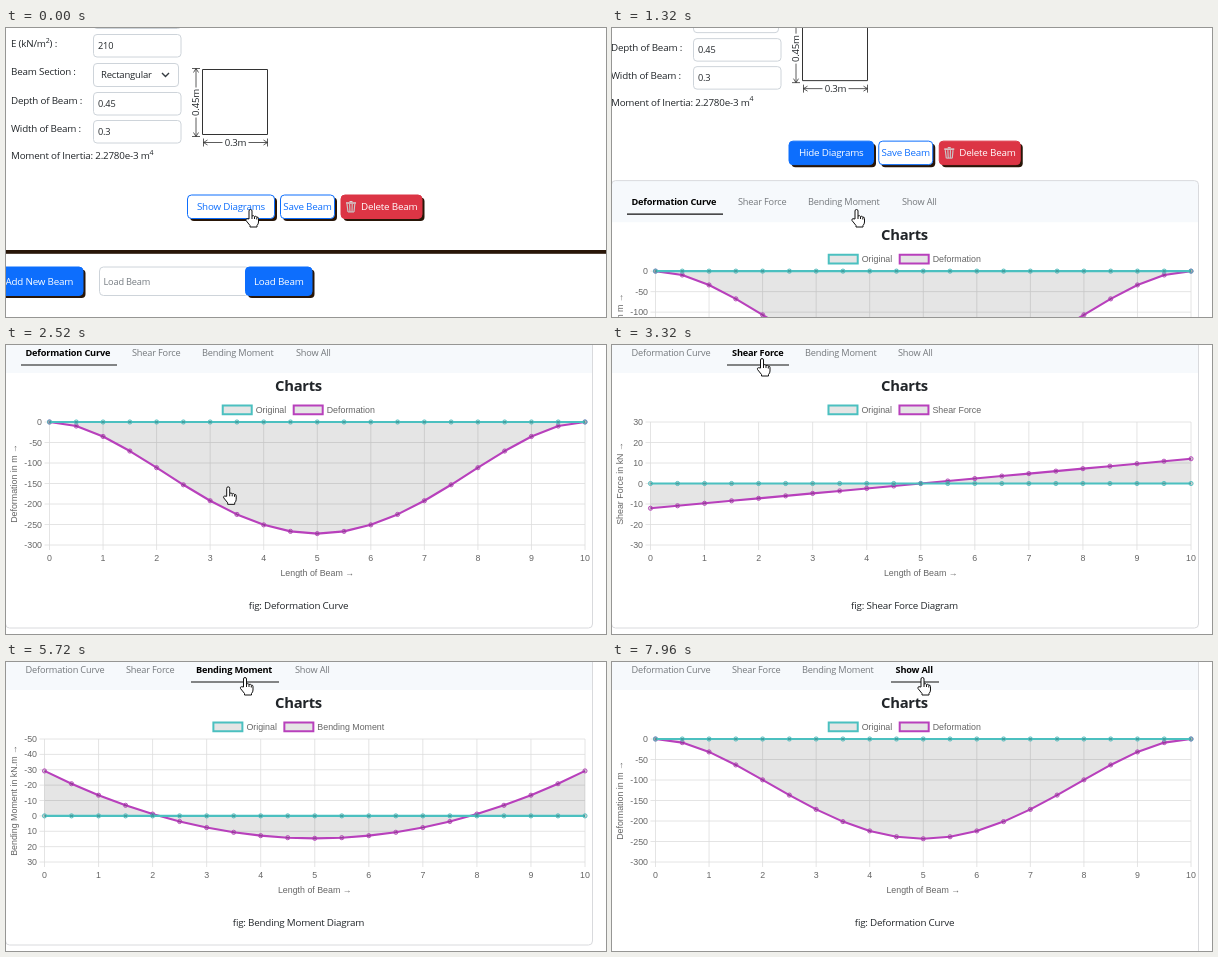
An HTML page with a canvas for the animation above (8 s loop, 600x289 px).

```html
<!DOCTYPE html>
<html lang="en">
<head>
<meta charset="utf-8">
<title>Beam diagrams</title>
<style>
html, body { margin: 0; width: 100%; height: 100%; overflow: hidden; background: #fff; }
canvas { display: block; }
</style>
</head>
<body>
<canvas id="stage" width="600" height="289"></canvas>
<script>
const ctx = document.getElementById('stage').getContext('2d');
const LOOP = 8000;
const UI = '"Open Sans", "Noto Sans", sans-serif';
const PLOT_FONT = '"Liberation Sans", Arial, sans-serif';
const INK = '#212529', BLUE = '#0d6efd', RED = '#dc3545', SHADOW = '#291608';
const TEAL = '#4bc0c0', PURPLE = '#b840bc', SHADE = 'rgba(0,0,0,.1)';
const SHOW_AT = 780;

// Fixed-end beam under a uniform load
const LOAD = 5, SPAN = 10, PEAK = 272.2;
const charts = {
  deformation: {
    name: 'Deformation', axis: 'Deformation in m →', caption: 'Deformation Curve',
    left: 43.5, top: 0, bottom: -300, step: 50,
    value: x => -PEAK * 16 * (x * (SPAN - x)) ** 2 / SPAN ** 4
  },
  shear: {
    name: 'Shear Force', axis: 'Shear Force in kN →', caption: 'Shear Force Diagram',
    left: 38.5, top: 30, bottom: -30, step: 10,
    value: x => LOAD * (x - SPAN / 2)
  },
  bending: {
    name: 'Bending Moment', axis: 'Bending Moment in kN.m →', caption: 'Bending Moment Diagram',
    left: 38.5, top: -50, bottom: 30, step: 10,
    value: x => LOAD * (6 * SPAN * x - SPAN ** 2 - 6 * x * x) / 12
  }
};
const tabNames = ['Deformation Curve', 'Shear Force', 'Bending Moment', 'Show All'];
const views = [
  { at: SHOW_AT, chart: charts.deformation, tabs: [19.5, 126, 196, 290], line: [15, 111] },
  { at: 3169, chart: charts.shear, tabs: [19.5, 120, 193, 286], line: [115, 177] },
  { at: 5460, chart: charts.bending, tabs: [19.5, 120, 190, 289], line: [185, 273] },
  { at: 7532, chart: charts.deformation, tabs: [19.5, 120, 190, 283.5], line: [279, 327] }
];

const scrollKeys = [[1175, 0], [1320, 53.5], [1720, 201.5], [1780, 214], [1860, 219], [1920, 220]];
const pointerKeys = [[2300, 244.5, 182], [3000, 150, 14], [4500, 150, 14],
  [5250, 239, 16], [6400, 239, 16], [7060, 310.5, 16]];

const smooth = u => u * u * (3 - 2 * u);
const easeOutQuart = u => 1 - (1 - u) ** 4;

function track(keys, time, ease = u => u) {
  const next = keys.findIndex(key => key[0] > time);
  if (next === 0) return keys[0].slice(1);
  if (next < 0) return keys.at(-1).slice(1);
  const a = keys[next - 1], b = keys[next];
  const u = ease((time - a[0]) / (b[0] - a[0]));
  return a.slice(1).map((v, i) => v + (b[i + 1] - v) * u);
}

function text(str, x, y, { size = 9.8, color = INK, align = 'left', weight = 400, family = UI } = {}) {
  ctx.font = `${weight} ${size}px ${family}`;
  ctx.letterSpacing = family === UI ? `${-0.02 * size}px` : '0px';
  ctx.fillStyle = color;
  ctx.textAlign = align;
  ctx.fillText(str, x, y + size * 0.35);
  return x + ctx.measureText(str).width;
}

function plotText(str, x, y, align = 'left') {
  return text(str, x, y, { size: 8.85, color: '#666', align, family: PLOT_FONT });
}

function turned(x, y, draw) {
  ctx.save();
  ctx.translate(x, y);
  ctx.rotate(-Math.PI / 2);
  draw();
  ctx.restore();
}

function box(x, y, w, h, r, fill, stroke, width = 1) {
  ctx.beginPath();
  ctx.roundRect(x, y, w, h, r);
  if (fill) { ctx.fillStyle = fill; ctx.fill(); }
  if (stroke) { ctx.strokeStyle = stroke; ctx.lineWidth = width; ctx.stroke(); }
}

function polyline(points, color, width = 1) {
  ctx.beginPath();
  points.forEach(p => ctx.lineTo(...p));
  ctx.strokeStyle = color;
  ctx.lineWidth = width;
  ctx.stroke();
}

function button(label, x, y, w, h, fill, border, color, textX = x + w / 2, align = 'center') {
  box(x + 2.5, y + 2.5, w, h, 4, SHADOW);
  box(x, y, w, h, 4, fill, border);
  text(label, textX, y + h / 2, { color, align });
}

function field(value, y) {
  box(87.5, y, 87.5, 22.5, 3.5, '#fff', '#ced4da');
  text(value, 92, y + 11.5, { size: 9.2 });
}

// Dimension line along x, centred on the origin
function dimension(label, half, gap) {
  for (const side of [-1, 1]) {
    const end = side * half;
    polyline([[side * gap, 0], [end, 0]], '#333', 0.8);
    polyline([[end, -4], [end, 4]], '#333', 0.8);
    polyline([[end - side * 4, -2.5], [end, 0], [end - side * 4, 2.5]], '#333', 0.8);
  }
  text(label, 0, 0, { size: 9.6, align: 'center' });
}

function trashIcon(x, y) {
  polyline([[x, y + 2], [x + 10, y + 2]], '#d5d5d5', 1.5);
  polyline([[x + 3.5, y + 0.5], [x + 6.5, y + 0.5]], '#d5d5d5');
  for (let i = 0; i < 4; i++) {
    polyline([[x + 1 + i * 2.6, y + 3], [x + 2 + i * 2, y + 11]], '#c8cccc', 1.1);
  }
  polyline([[x + 2, y + 11], [x + 8, y + 11]], '#c8cccc');
}

function drawForm(open) {
  field('', -22);
  text(') :', text('2', text('E (kN/m', 5, 16), 12.5, { size: 7 }), 16);
  field('210', 6.5);
  text('Beam Section :', 5, 44);
  box(87.5, 35.5, 85, 23, 3.5, '#fff', '#ced4da');
  text('Rectangular', 95, 47, { size: 9.5 });
  polyline([[156, 45], [159.5, 48.5], [163, 45]], '#343a40', 1.4);
  text('Depth of Beam :', 5, 73);
  field('0.45', 64.5);
  text('Width of Beam :', 5, 101);
  field('0.3', 92.5);
  text('4', text('Moment of Inertia: 2.2780e-3 m', 5, 128), 124.5, { size: 7 });

  box(196.5, 41.5, 65, 65, 0, null, '#333');
  turned(190, 74.5, () => dimension('0.45m', 34, 15));
  ctx.save();
  ctx.translate(229.5, 114.5);
  dimension('0.3m', 32, 13);
  ctx.restore();

  const inset = open ? 1.75 : 0;
  if (open) button('Hide Diagrams', 183, 167, 84.5, 23.5, BLUE, BLUE, '#fff');
  else button('Show Diagrams', 181.5, 167, 87, 23.5, '#fff', BLUE, BLUE);
  button('Save Beam', 274.5 - inset, 167, 54, 23.5, '#fff', BLUE, BLUE);
  button('Delete Beam', 335 - inset, 167, 81, 23.5, RED, RED, '#fff', 355 - inset, 'left');
  trashIcon(340 - inset, 173);
}

function drawFooter() {
  ctx.fillStyle = SHADOW;
  ctx.fillRect(0, 222, 600, 3.8);
  button('Add New Beam', -10, 239, 87, 28.5, BLUE, BLUE, '#fff', -0.5, 'left');
  box(93.5, 239, 150, 28.5, 4, '#fff', '#ced4da');
  text('Load Beam', 97.5, 253.5, { size: 9.2, color: '#757b81' });
  button('Load Beam', 239.5, 239, 66.5, 28.5, BLUE, BLUE, '#fff');
}

function drawLegend(name) {
  ctx.font = `8.85px ${PLOT_FONT}`;
  ctx.letterSpacing = '0px';
  const width = ['Original', name].reduce((sum, s) => sum + ctx.measureText(s).width, 74.5);
  let x = 292.3 - width / 2;
  for (const [label, color] of [['Original', TEAL], [name, PURPLE]]) {
    box(x + 1, 60.5, 29, 8.8, 0, '#e5e5e5', color, 2);
    x = plotText(label, x + 34, 64.5) + 6.5;
  }
}

function drawChart(chart, progress) {
  const { left, top, bottom, step } = chart;
  const right = 579, plotTop = 77, plotBottom = 200;
  const px = x => left + x / SPAN * (right - left);
  const py = v => plotTop + (v - top) / (bottom - top) * (plotBottom - plotTop);
  const grid = '#dedede';

  text('Charts', 292.5, 40.5, { size: 14.8, weight: 700, align: 'center' });
  drawLegend(chart.name);

  const direction = Math.sign(bottom - top);
  for (let v = top; direction * v <= direction * bottom; v += direction * step) {
    polyline([[left - 5, py(v)], [right, py(v)]], grid, 0.8);
    plotText(String(v), left - 7.5, py(v), 'right');
  }
  for (let x = 0; x <= SPAN; x++) {
    polyline([[px(x), plotTop], [px(x), plotBottom + 5]], grid, 0.8);
    plotText(String(x), px(x), 212.5, 'center');
  }
  plotText('Length of Beam →', (left + right) / 2, 228, 'center');
  turned(7.5, 138.5, () => plotText(chart.axis, 0, 0, 'center'));

  const samples = Array.from({ length: 21 }, (_, i) => i / 2);
  const base = samples.map(x => [px(x), py(0)]);
  const curve = samples.map(x => [px(x), py(chart.value(x) * progress)]);

  ctx.beginPath();
  [base[0], ...curve, base[20]].forEach(p => ctx.lineTo(...p));
  ctx.fillStyle = SHADE;
  ctx.fill();
  for (const [points, color] of [[curve, PURPLE], [base, TEAL]]) {
    ctx.lineJoin = 'round';
    polyline(points, color, 2.1);
    for (const [x, y] of points) {
      ctx.beginPath();
      ctx.arc(x, y, 2.1, 0, 7);
      ctx.fillStyle = 'rgba(0,0,0,.16)';
      ctx.fill();
      ctx.lineWidth = 0.9;
      ctx.stroke();
    }
  }
  text('fig: ' + chart.caption, 292.5, 260.5, { align: 'center' });
}

function drawCard(view, time) {
  const active = views.indexOf(view);
  const height = active === 3 ? 900 : 296.5;
  box(-0.5, -13.5, 587, height, 4, '#fff');
  box(-0.5, -13.5, 587, 41.5, [4, 4, 0, 0], '#f6f9fc');
  box(-0.5, -13.5, 587, height, 4, null, '#d9dadd');
  tabNames.forEach((name, i) => text(name, view.tabs[i], 7.5, {
    size: 9.2,
    weight: i === active ? 700 : 400,
    color: i === active ? '#000' : '#74787c'
  }));
  polyline([[view.line[0], 20], [view.line[1], 20]], '#111', 1.1);
  drawChart(view.chart, easeOutQuart(Math.min(1, (time - view.at) / 1000)));
}

const hand = new Path2D('M-1.5 9V1a1.5 1.5 0 0 1 3 0V6q1.5-1 2.5.5q1.5-.8 2.3.6q1.7-.3 1.7 1.4V12' +
  'q0 2-1.5 3.5V17H-.5V15.5L-4.5 10.5q-.6-1.5 1-1.8z');

function drawPointer(x, y) {
  ctx.save();
  ctx.translate(x, y);
  ctx.fillStyle = '#fff';
  ctx.fill(hand);
  ctx.strokeStyle = '#111';
  ctx.lineWidth = 1;
  ctx.stroke(hand);
  ctx.stroke(new Path2D('M1.5 6V9M4 7V9M6.3 7.5V9.5'));
  ctx.restore();
}

function draw(time) {
  const view = views.findLast(v => time >= v.at);
  const [scroll] = track(scrollKeys, time);
  ctx.fillStyle = '#fff';
  ctx.fillRect(0, 0, 600, 289);

  ctx.save();
  ctx.translate(view ? -6 : 0, -scroll);
  drawForm(Boolean(view));
  if (!view) drawFooter();
  ctx.restore();

  if (view) {
    ctx.save();
    ctx.translate(0, 220 - scroll);
    drawCard(view, time);
    ctx.restore();
  }
  drawPointer(...track(pointerKeys, time, smooth));
}

const start = performance.now();
function tick() {
  draw((performance.now() - start) % LOOP);
  requestAnimationFrame(tick);
}
tick();
</script>
</body>
</html>
```
